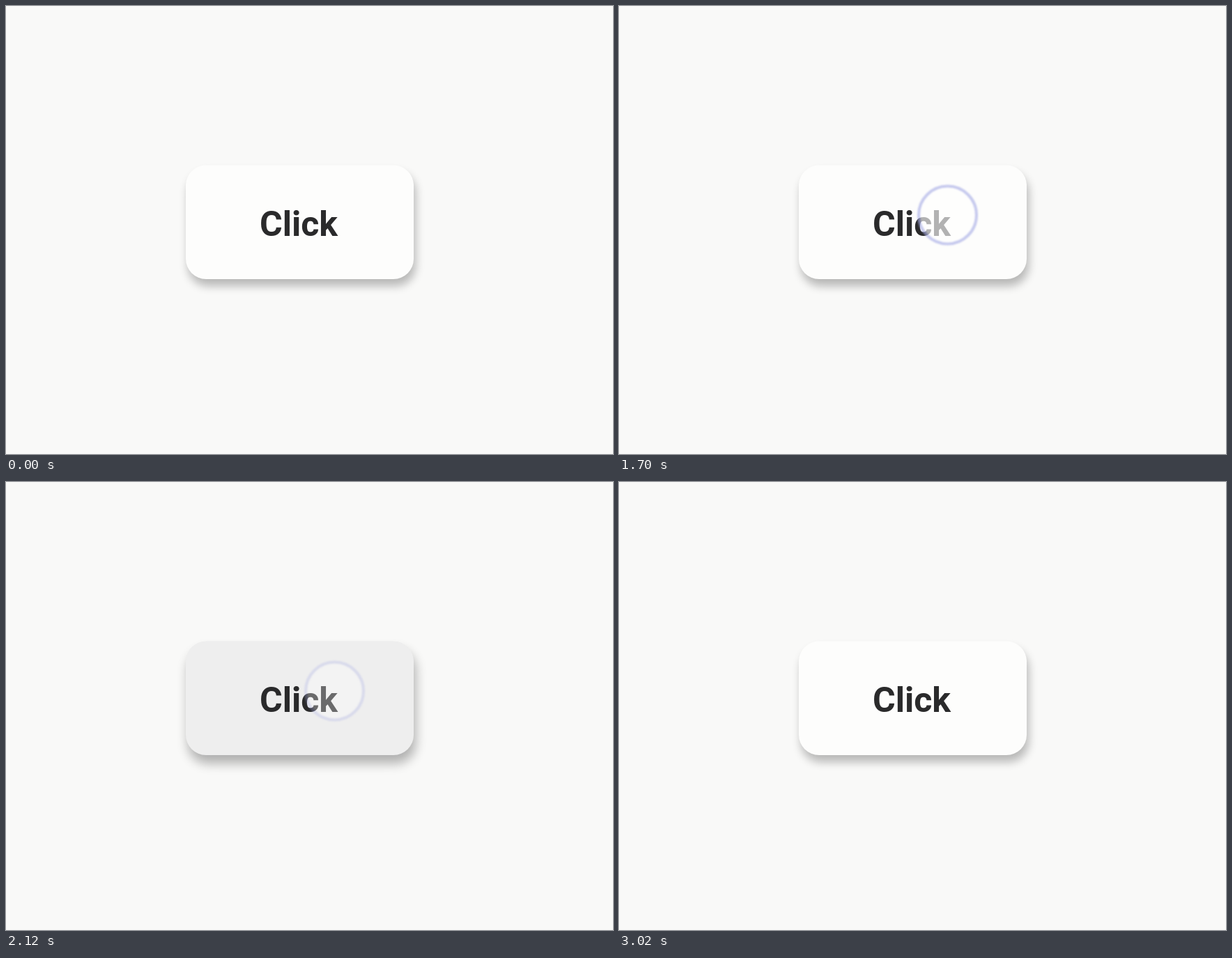
Recreate the animation shown at these times as an HTML page. Size 871 by 643 pixels, loop 6460 ms.

```html
<!DOCTYPE html>
<html lang="en">
<head>
<meta charset="utf-8">
<title>Button press</title>
<style>
  html, body { margin: 0; width: 100%; height: 100%; overflow: hidden; background: #f9f9f8; }
  svg { display: block; width: 871px; height: 643px; }
  text { font: 700 50px Roboto, Arial, sans-serif; fill: #2a2a2b; }
</style>
</head>
<body>
<svg viewBox="0 0 871 643">
  <defs>
    <rect id="shape" x="258" y="228.5" width="327" height="163.5" rx="29"/>
    <clipPath id="face"><use href="#shape"/></clipPath>
    <filter id="blur" x="-30%" y="-50%" width="160%" height="200%"><feGaussianBlur id="spread"/></filter>
    <filter id="soften" x="-20%" y="-20%" width="140%" height="140%"><feGaussianBlur stdDeviation="1"/></filter>
    <filter id="smooth"><feGaussianBlur stdDeviation="0.6"/></filter>
  </defs>
  <g id="button">
    <g id="shadow"><use href="#shape" filter="url(#blur)"/></g>
    <use href="#shape" fill="#fdfdfc"/>
    <g clip-path="url(#face)"><circle id="ripple" cx="470" cy="300" fill="#101028"/></g>
    <text x="364" y="330" filter="url(#smooth)">Click</text>
  </g>
  <g id="pointer">
    <circle r="41.5" fill="#fff"/>
    <circle r="41.5" fill="none" stroke="#a9aee6" stroke-width="4.2" filter="url(#soften)"/>
  </g>
</svg>
<script>
const LOOP = 6460;
const $ = id => document.getElementById(id);
const mix = (a, b, p) => a + (b - a) * p;
const phase = (t, from, to) => Math.min(1, Math.max(0, (t - from) / (to - from)));
const easeOut = p => 1 - (1 - p) ** 3;

function set(id, attrs) {
  for (const name in attrs) $(id).setAttribute(name, attrs[name]);
}

function render(t) {
  const scale = 1 - .02 * Math.sin(Math.PI * phase(t, 1700, 2120));
  set('button', { transform: `translate(421.5 310.25) scale(${scale}) translate(-421.5 -310.25)` });

  const lift = phase(t, 1690, 1920) * (1 - phase(t, 2240, 2560));
  set('shadow', { transform: `translate(3 ${mix(10, 12, lift)})`, opacity: mix(.26, .29, lift) });
  set('spread', { stdDeviation: mix(6.5, 8, lift) });

  set('ripple', {
    r: 270 * phase(t, 1700, 2130) ** 2,
    'fill-opacity': .088 * (1 - phase(t, 1960, 2500))
  });

  const arrive = easeOut(phase(t, 940, 1580));
  const shown = phase(t, 940, 1580) * (1 - phase(t, 1700, 2280) ** 2);
  set('pointer', {
    transform: `translate(${mix(499, 471.5, arrive)} ${mix(303, 300, arrive)}) scale(${mix(1.85, 1, arrive)})`,
    opacity: .64 * shown
  });
}

const start = performance.now();
function frame() {
  render((performance.now() - start) % LOOP);
  requestAnimationFrame(frame);
}
frame();
</script>
</body>
</html>
```
